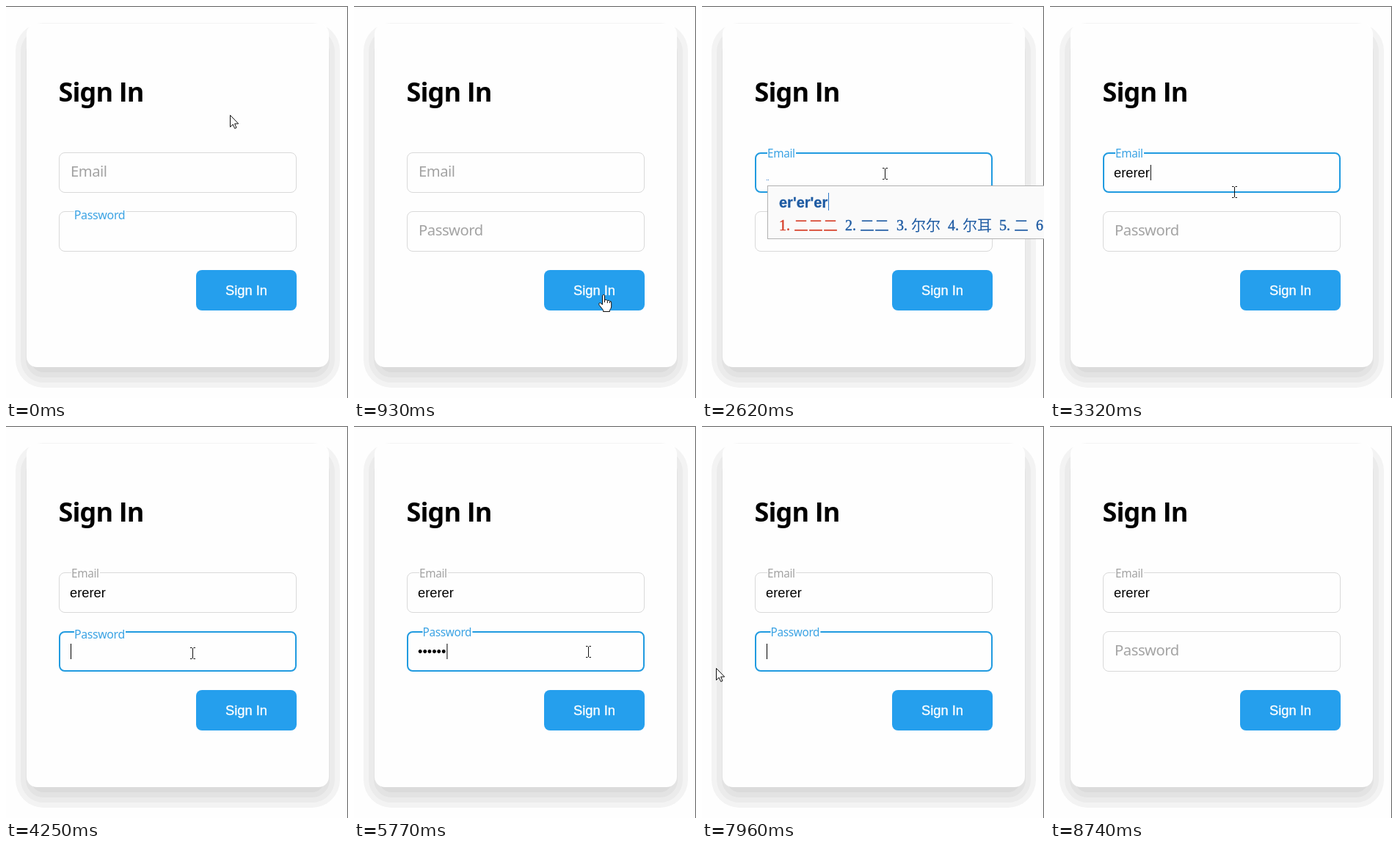
These frames come from a looping animation (466x533 px, 9200 ms). An HTML page:

```html
<!DOCTYPE html>
<html lang="en">
<head>
<meta charset="utf-8">
<title>Sign in form</title>
<style>
  html, body { margin: 0; width: 100%; height: 100%; overflow: hidden; background: #fefefe; }
  svg { display: block; width: 466px; height: 533px; }
  .label { font-family: "Noto Sans", "Open Sans", sans-serif; }
  .arial { font-family: "Liberation Sans", Arial, sans-serif; font-size: 18.3px; }
  .typed { font-size: 20px; font-weight: 700; fill: #1e5ba3; stroke: #1e5ba3; stroke-width: .3px; }
  .cjk { font: 500 20px "Noto Sans CJK SC", "Noto Sans CJK", sans-serif; }
  .digit { font: 20px "Liberation Serif", serif; stroke-width: .4px; }
</style>
</head>
<body>
<svg viewBox="0 0 466 533" xmlns="http://www.w3.org/2000/svg">
  <rect width="466" height="533" fill="#fefefe"/>
  <g id="shadow"></g>
  <rect x="28" y="24" width="412" height="467" rx="14" fill="#fefefe"/>
  <path d="M0 .5H465.500V533" fill="none" stroke="#606060"/>
  <text x="71.500" y="130" font-size="36" font-weight="700" letter-spacing="-.9" class="label">Sign <tspan font-family="Open Sans, sans-serif">I</tspan>n</text>
  <g id="fields"></g>
  <rect x="259" y="359" width="137" height="55" rx="8" fill="#259fed"/>
  <text x="299" y="393" class="arial" fill="#fff" stroke="#fff" stroke-width=".3">Sign In</text>
  <g id="popup">
    <rect x="89.500" y="244.500" width="390" height="72" fill="#fafafa" stroke="#b2b2b2"/>
    <text id="typed" x="105" y="273.500" class="arial typed"></text>
    <rect id="typedCaret" y="254" width="1" height="24" fill="#2d78c8"/>
    <g id="choices"></g>
  </g>
  <path id="arrow" d="M.5 .5V16.500L4.200 13L6.700 18.500L9 17.500L6.600 12H11.700Z" fill="#fff" stroke="#111"/>
  <g id="hand" stroke="#111">
    <path d="M-1.500 1.500Q0 -.5 1.500 1.500V8Q4 6.500 5.300 8.500Q7.500 7.500 8.500 9.500Q10.500 9 10.700 11V17Q10 20 8.500 21.500V23.500H-.5V21.500Q-3 18-6 14.500Q-7 11.500-4.500 11.500L-1.500 14Z" fill="#fff" stroke-linejoin="round"/>
    <path d="M1.500 8V11M5.300 9V12M8.500 10V12"/>
  </g>
  <path id="beam" d="M-3 -7.500H-.5M1.500 -7.500H4M-3 7.500H-.5M1.500 7.500H4M.5 -7V7" fill="none" stroke="#111"/>
</svg>
<script>
const LOOP = 9200, BLUE = '#219be0', GRAY = '#a3a3a3', INK = '#1e5ba3';
const $ = id => document.getElementById(id);

function add(parent, tag, attrs, text) {
  const el = document.createElementNS('http://www.w3.org/2000/svg', tag);
  set(el, attrs);
  if (text) el.textContent = text;
  parent.append(el);
  return el;
}
function set(el, attrs) {
  for (const key in attrs) el.setAttribute(key, attrs[key]);
}
const show = (el, on) => set(el, { visibility: on ? 'visible' : 'hidden' });
const mix = (a, b, p) => a + (b - a) * p;
const clamp = (v, low, high) => Math.min(high, Math.max(low, v));
function ease(t, from, to) {
  const p = clamp((t - from) / (to - from), 0, 1);
  return p * p * (3 - 2 * p);
}

// Bursts of picture changes: first, last, count; the picture rests in between.
const BURSTS = [
  [120, 1080, 8], [1390, 2320, 8], [2470, 2620, 2], [2930, 3860, 8], [4010, 4400, 4],
  [4680, 4680, 1], [5110, 6130, 9], [6280, 6640, 4], [6920, 7280, 4], [7840, 8740, 8]
];
function held(t) {
  const burst = BURSTS.filter(b => b[0] <= t).pop();
  if (!burst) return 0;
  const [first, last, count] = burst;
  let shown = first;
  for (let i = 1; i < count; i++) {
    const next = first + 30 * Math.floor((last - first) / 30 * i / (count - 1));
    if (next <= t) shown = next;
  }
  return shown;
}

// Pointer moves: start, end, and where each one leads.
const MOVES = [
  [0, 660, 378, 350], [660, 930, 340, 392], [1390, 1930, 249, 228], [3000, 3860, 254, 309],
  [5500, 6130, 454, 303], [6130, 6640, 304, 325], [6920, 7280, 4, 318], [7840, 8740, 305, 540]
];
function pointer(t) {
  let x = 305, y = 148;
  for (const [from, to, toX, toY] of MOVES) {
    const p = ease(t, from, to);
    x = mix(x, toX, p);
    y = mix(y, toY, p);
  }
  return [Math.round(x), Math.round(y)];
}
function pointerKind(x, y, dragging) {
  const inside = (left, top) => x >= left && x < 396 && y >= top && y < top + 55;
  if (inside(259, 359)) return 'hand';
  return dragging || inside(72, 199) || inside(72, 279) ? 'beam' : 'arrow';
}

['#f3f3f3', '#ebebeb', '#e3e3e3', '#dbdbdb'].forEach((fill, i) => add($('shadow'), 'rect', {
  x: 13 + 7 * i, y: 23 + 8 * i, width: 442 - 14 * i, height: 496 - 15 * i, rx: 38 - 7 * i, fill
}));

function makeField(name, y, width, floatX, step) {
  const g = add($('fields'), 'g', { transform: `translate(0 ${y})` });
  const box = add(g, 'rect', { fill: '#fefefe' });
  const gap = add(g, 'rect', { fill: '#fefefe' });
  const label = add(g, 'text', { class: 'label', 'letter-spacing': '-.022em' }, name);
  const mark = add(g, 'rect', { x: 87, y: 17, width: 39, height: 21, fill: '#2b7fdc' });
  const value = add(g, 'text', { x: 87, y: 34, class: 'arial' });
  const caret = add(g, 'rect', { y: 17, width: 1, height: 21 });
  return s => {
    const inset = s.focus ? 1 : .5;
    set(box, {
      x: 72 + inset, y: inset, width: 324 - 2 * inset, height: 55 - 2 * inset, rx: 8 - inset,
      stroke: s.focus ? BLUE : '#d9d9d9', 'stroke-width': 2 * inset
    });
    const scale = mix(1, .76, s.rise), size = 20.2 * scale;
    const x = mix(88, floatX, s.rise), base = mix(33, 7, s.rise);
    set(label, { x, y: base, 'font-size': size, fill: s.blue ? '#3ba3e4' : GRAY });
    set(gap, { x, y: base - size * .8, width: width * scale + 1, height: size });
    value.textContent = s.text;
    set(value, { fill: s.selected ? '#fff' : '#000' });
    show(mark, s.selected);
    set(caret, { x: 88 + s.text.length * step });
    show(caret, s.caret);
  };
}
const drawEmail = makeField('Email', 199, 50, 89, 8.13);
const drawPass = makeField('Password', 279, 88, 93.5, 6.4);
const compose = add($('fields'), 'path', {
  d: 'M88 236.500H91', stroke: '#2d78c8', 'stroke-dasharray': '1 1'
});

const CHOICES = ['二 而 儿 尔 耳 贰 饵 迩', '二二 尔尔 尔耳 二 而 儿', '二二二 二二 尔尔 尔耳 二 而'];

function drawPopup(t, on) {
  show($('popup'), on);
  show(compose, on);
  if (!on) return;
  const n = clamp(Math.floor((t - 2170) / 150), 1, 3);
  $('typed').textContent = Array(n).fill('er').join("'");
  set($('typedCaret'), { x: 106 + Math.round($('typed').getComputedTextLength()) });
  $('choices').replaceChildren();
  let x = 105;
  CHOICES[n - 1].split(' ').forEach((word, i) => {
    const fill = i ? INK : '#d63c25';
    add($('choices'), 'text', { x, y: 305, class: 'digit', fill, stroke: fill }, `${i + 1}.`);
    add($('choices'), 'text', { x: x + 20, y: 305.5, class: 'cjk', fill }, word);
    x += 30 + 20 * word.length;
  });
}

function draw(time) {
  const t = held(time);
  const between = (a, b) => t >= a && t < b;
  const rise = start => ease(t, start, start + 300);

  const composing = between(2320, 2930);
  const emailOn = between(1810, 3860);
  drawEmail({
    focus: emailOn, blue: emailOn, rise: rise(1810),
    text: t >= 2930 ? 'ererer' : '', caret: emailOn && !composing
  });

  const selected = between(7160, 7840);
  const passOn = between(4010, 6000) || between(7040, 8350);
  const dots = t < 7840 ? clamp(Math.floor((t - 5010) / 100), 0, 6) : 0;
  drawPass({
    focus: passOn, blue: passOn || t < 120,
    rise: 1 - rise(-70) + rise(4010) - rise(8350),
    text: '•'.repeat(dots), selected,
    caret: passOn && !selected && !between(4680, 5110)
  });

  drawPopup(t, composing);

  const [x, y] = pointer(t), kind = pointerKind(x, y, between(7040, 7960));
  for (const id of ['arrow', 'hand', 'beam']) {
    show($(id), id === kind);
    set($(id), { transform: `translate(${x} ${y})` });
  }
}

const begin = performance.now();
function frame() {
  draw((performance.now() - begin) % LOOP);
  requestAnimationFrame(frame);
}
frame();
</script>
</body>
</html>
```
